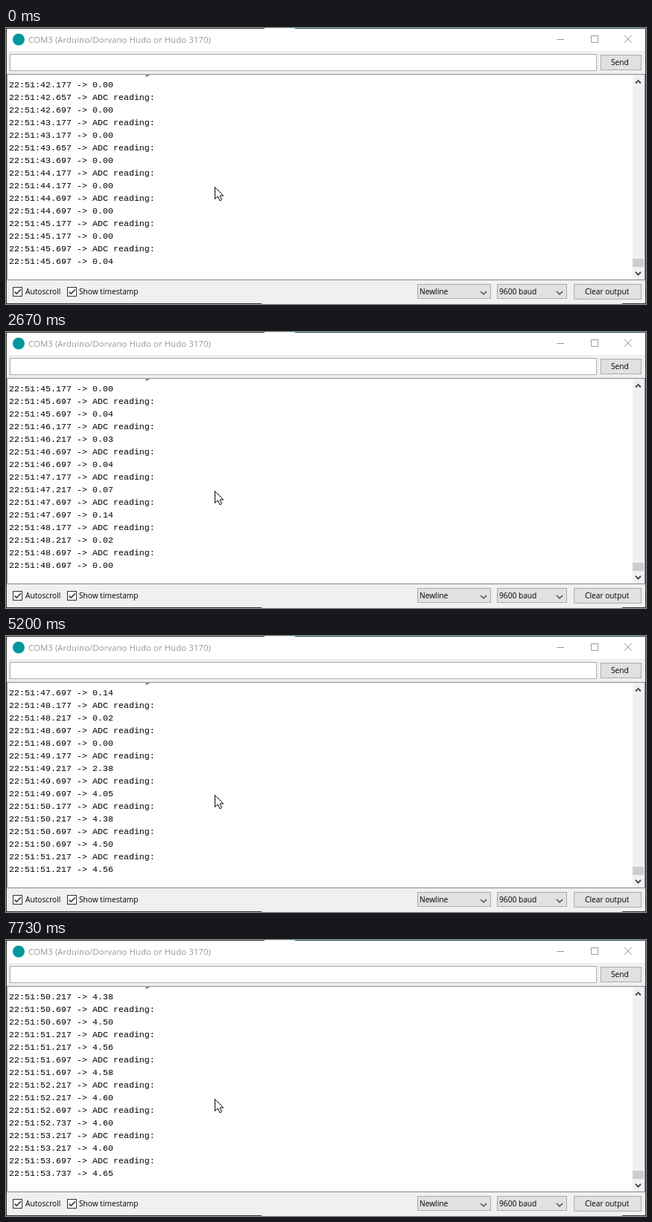
An HTML page for the animation above (8000 ms loop, 859x372 px).

```html
<!DOCTYPE html>
<html lang="en">
<head>
<meta charset="utf-8">
<title>Serial monitor</title>
<style>
  html, body { margin: 0; width: 100%; height: 100%; overflow: hidden; }
  svg { display: block; width: 859px; height: 372px; }
  .ui { font: 10.2px "Open Sans", sans-serif; }
  .title { font: 11.5px "Open Sans", sans-serif; fill: #999; }
  .log { font: 11.667px "Liberation Mono", monospace; }
  .button { fill: #e1e1e1; stroke: #adadad; }
  .field { fill: #fff; stroke: #abadb3; }
  .check { fill: #fff; stroke: #333; }
  .line { fill: none; stroke: #999; }
  .chevron { fill: none; stroke: #505050; stroke-width: 1.5; }
  .scroll { stroke-width: 2; }
  .tick { fill: none; stroke: #222; stroke-width: 1.4; }
</style>
</head>
<body>
<svg viewBox="0 0 859 372">
  <defs>
    <clipPath id="logArea"><path d="M2 63H841V339H2z"/></clipPath>
    <g id="checkbox">
      <rect class="check" x=".5" y=".5" width="12" height="12"/>
      <path class="tick" d="M2.5 6.5L5.3 9.3L10.7 3.5"/>
    </g>
  </defs>

  <!-- Window frame and title bar -->
  <rect width="859" height="372" fill="#333"/>
  <path d="M388 0H859V1H388z" fill="#1d5c5c"/>
  <path d="M347 0H388V1H347zM343 371H827V372H343z" fill="#eee"/>
  <rect x="1" y="1" width="857" height="370" fill="#f0f0f0"/>
  <rect x="1" y="1" width="857" height="30" fill="#fff"/>
  <circle cx="17" cy="15.5" r="8" fill="#00979c"/>
  <text class="title" x="30" y="20">COM3 (Arduino/Dorvano Hudo or Hudo 3170)</text>
  <path class="line" d="M739 15.5H749M785.5 10.5H794.5V19.5H785.5zM830 10L840 20M840 10L830 20"/>

  <!-- Input row -->
  <rect class="field" x="5.5" y="35.5" width="787" height="22"/>
  <rect class="button" x="798.5" y="36.5" width="54" height="20"/>

  <!-- Log area with scrollbar -->
  <rect x="1.5" y="62.5" width="856" height="277" fill="#fff" stroke="#828790"/>
  <rect x="841" y="63" width="16" height="276" fill="#f0f0f0"/>
  <rect x="841" y="311" width="15" height="11" fill="#cdcdcd"/>
  <path class="chevron scroll" d="M845 74.5L848.5 71L852 74.5M845 329L848.5 332.5L852 329"/>
  <g id="log" class="log" clip-path="url(#logArea)"></g>

  <!-- Bottom row -->
  <use href="#checkbox" x="9" y="349"/>
  <use href="#checkbox" x="82" y="349"/>
  <rect class="button" x="552.5" y="345.5" width="98" height="19"/>
  <rect class="button" x="659.5" y="345.5" width="93" height="19"/>
  <rect class="button" x="762.5" y="345.5" width="90" height="20"/>
  <path class="chevron" d="M637 355L641 359L645 355M739 355L743 359L747 355"/>
  <g class="ui">
    <text x="812" y="50">Send</text>
    <text x="26" y="359">Autoscroll</text>
    <text x="98" y="359">Show timestamp</text>
    <text x="555" y="359">Newline</text>
    <text x="662" y="359">9600 baud</text>
    <text x="777" y="359">Clear output</text>
  </g>

  <path d="M280.5 214.5V230.5L284.3 227L287 232.8L289.6 231.6L287 226H291.8z" fill="#fff" stroke="#000"/>
</svg>
<script>
const LOOP = 8000, FPS = 15;
const ROWS = 17, ROW_HEIGHT = 17;
const PERIOD = 501.6; // ms between readings
const POLL = 40;      // ms between reads of the serial port
const LABEL = 'ADC reading:';
const LABEL_BYTES = LABEL.length + 2; // with CR and LF

// Voltages from reading -1 on; all earlier ones are zero
const VOLTS = [.04, .03, .04, .07, .14, .02, 0, 2.38, 4.05, 4.38, 4.5, 4.56, 4.58, 4.6, 4.6, 4.6, 4.65];
const FIRST = -8, LAST = VOLTS.length - 2;

// Timestamps fall on the polling grid
function stamp(k, phase, text) {
  const polls = Math.floor(k * PERIOD / POLL + phase);
  return `22:51:${(46.177 + polls * POLL / 1000).toFixed(3)} -> ${text}`;
}

// Finished lines, followed by the line still being received
function linesAt(ms) {
  const frame = Math.floor((ms + 5) * FPS / 1000);
  const lines = [];
  let pending = '';
  for (let k = FIRST; k <= LAST; k++) {
    const arrival = (220 + k * PERIOD) * FPS / 1000;
    const shownAt = Math.floor(arrival);
    const label = stamp(k, .63, LABEL);
    const value = (VOLTS[k + 1] || 0).toFixed(2);
    if (frame >= shownAt) {
      lines.push(label, stamp(k, 1, value));
    } else if (frame === shownAt - 1 && arrival - shownAt < .5) {
      // An early arrival shows part of its message one frame ahead
      const bytes = 17 - (k + 8) % 17;
      if (bytes > LABEL_BYTES) {
        lines.push(label);
        pending = stamp(k, 1, value.slice(0, bytes - LABEL_BYTES));
      } else {
        pending = stamp(k, .63, LABEL.slice(0, bytes));
      }
    }
  }
  return [...lines, pending];
}

const log = document.getElementById('log');
const rows = Array.from({ length: ROWS }, (_, i) => {
  const row = document.createElementNS('http://www.w3.org/2000/svg', 'text');
  row.setAttribute('x', 4);
  row.setAttribute('y', 63 + i * ROW_HEIGHT);
  return log.appendChild(row);
});

function draw() {
  const visible = linesAt(performance.now() % LOOP).slice(-ROWS);
  rows.forEach((row, i) => {
    if (row.textContent !== visible[i]) row.textContent = visible[i];
  });
  requestAnimationFrame(draw);
}
draw();
</script>
</body>
</html>
```
